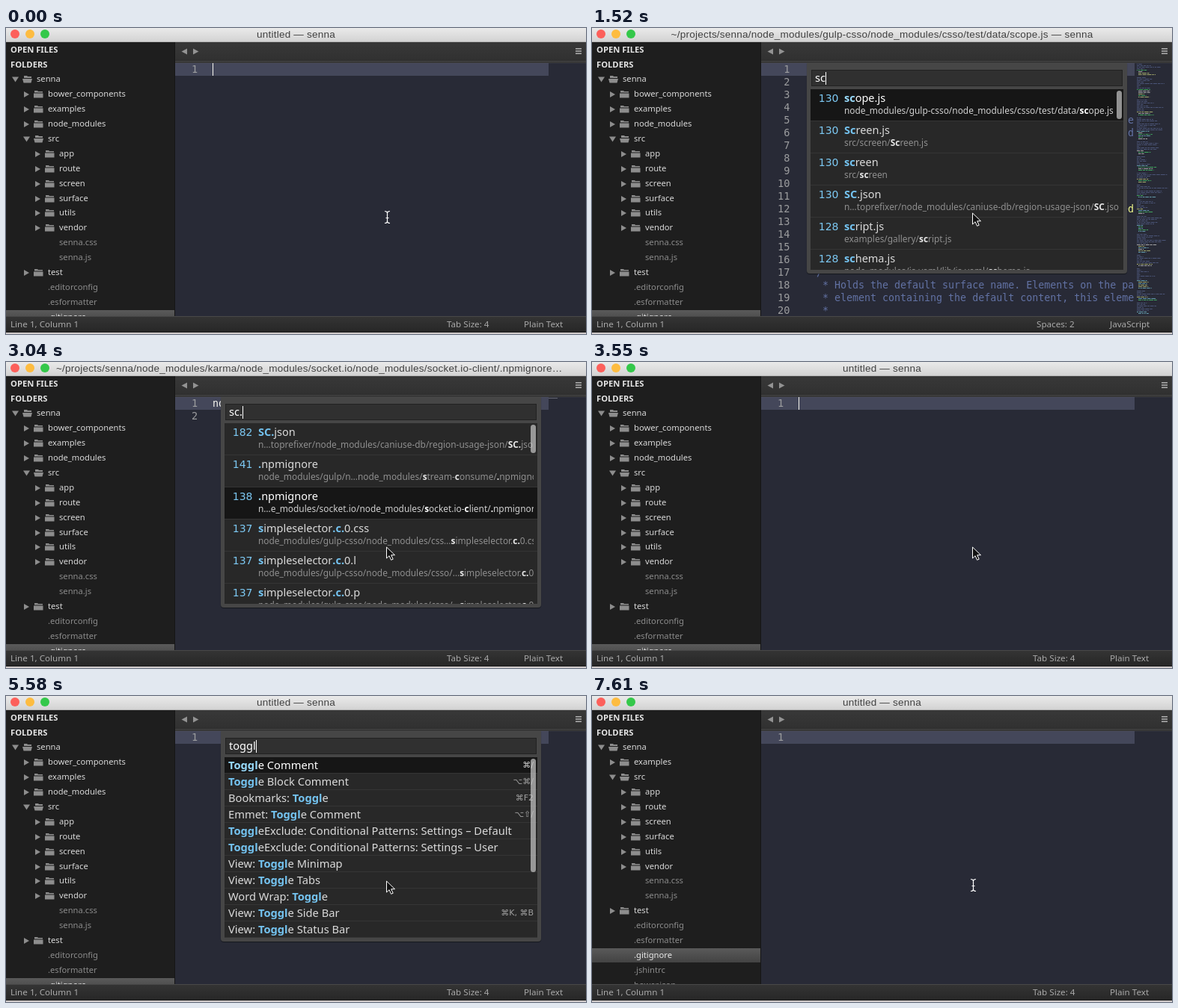
Recreate the animation shown at these times as an HTML page with a canvas. Size 775 px wide and 410 px high, loop 8 s.

```html
<!DOCTYPE html>
<html lang="en">
<head>
<meta charset="utf-8">
<title>Editor quick panel</title>
<style>
html, body { margin: 0; width: 100%; height: 100%; overflow: hidden; background: #282a36; }
#stage { position: relative; width: 775px; height: 410px; overflow: hidden; font: 11.2px "Noto Sans", "Open Sans", sans-serif; color: #d8d8d8; }
#stage div, #stage canvas, #stage svg { position: absolute; white-space: pre; }
#bar { left: 0; top: 0; width: 775px; height: 18px; background: linear-gradient(#eaeaea, #d3d3d3); border-bottom: 1px solid #b5b5b5; }
#bar i { position: absolute; top: 2px; width: 12px; height: 12px; border-radius: 50%; }
#title { left: 0; top: 0; width: 775px; text-align: center; color: #404040; font: 13.5px/17px "Liberation Sans", Arial, sans-serif; letter-spacing: .24px; }
#title.long { left: 67px; width: 708px; text-align: left; }
#side { left: 0; top: 19px; width: 225px; height: 367px; overflow: hidden; background: #1e1e1e; border-right: 1px solid #161616; }
#side .head { left: 6px; line-height: 19.4px; font-weight: 700; color: #e4e4e4; }
#side .row { left: 0; width: 225px; height: 19px; line-height: 17.6px; }
#side .row.file { color: #8b8b8b; }
#side .row.on { background: linear-gradient(#5a5a5a, #434343); color: #e8e8e8; }
#tabs { left: 226px; top: 19px; width: 549px; height: 24px; background: linear-gradient(#383838, #313131); }
#edge { left: 226px; top: 43px; width: 549px; height: 1px; background: #4d4d4d; border: solid #292929; border-width: 1px 0; box-shadow: 0 1px #434343; }
#editor { left: 226px; top: 47px; width: 549px; height: 339px; overflow: hidden; background: #282a36; font: 13.3px/17px "DejaVu Sans Mono", monospace; }
#line { left: 0; top: 0; width: 499px; height: 17px; background: #44475a; }
#nums { left: 22px; top: 0; text-align: right; color: #9c9d9f; font-size: 13.6px; }
#code { left: 50px; top: 0; width: 449px; height: 339px; overflow: hidden; color: #6272a4; }
#caret { left: 50px; top: 0; width: 1px; height: 17px; background: #f8f8f0; }
#map { left: 499px; top: 0; }
#foot { left: 0; top: 386px; width: 775px; height: 20px; line-height: 20px; font-size: 11.65px; color: #a9a9a9; background: linear-gradient(#343434, #272727); border-top: 1px solid #484848; border-bottom: 1px solid #1c1c1c; }
#rim { left: 0; top: 408px; width: 775px; height: 2px; background: #cfcaca; }
#panel { left: 287px; top: 47px; width: 428px; background: #464646; border-radius: 0 0 4px 4px; box-shadow: 0 1px 1px rgba(0, 0, 0, .45); }
#query { left: 6px; top: 9px; width: 410px; height: 20px; padding-left: 4px; border: 1px solid #222; background: #303030; font-size: 14.6px; font-weight: 500; line-height: 19px; color: #fff; }
#query i { display: inline-block; width: 1px; height: 17px; margin-bottom: -4px; background: #fff; }
#list { left: 5px; top: 35px; width: 418px; overflow: hidden; background: #282828; }
#list .item { left: 0; width: 418px; box-sizing: border-box; border-bottom: 1px solid #353535; color: #dadada; font-size: 14.7px; }
#list .item.on { background: #161616; color: #fff; }
#list .name { left: 5px; line-height: 20.6px; font-weight: 500; }
#list b { color: #74c3f0; }
#list .on b { color: #98dafc; }
#list .key { right: 5px; font: 11px/21px "DejaVu Sans", sans-serif; color: #a0a0a0; }
#list .on .key { color: #d0d0d0; }
#list .score { left: 0; width: 37.5px; text-align: right; font: 14px/24px "DejaVu Sans", sans-serif; color: #7cc8f2; }
#list .path { top: 19px; width: 368px; overflow: hidden; font-size: 11.9px; line-height: 19px; color: #8f8f8f; }
#list .path b { color: #e6e6e6; }
#list .on .path { color: #d0d0d0; }
#list .on .path b { color: #fff; }
#thumb { left: 414px; top: 37px; width: 7px; border-radius: 4px; background: rgba(200, 200, 200, .7); }
</style>
</head>
<body>
<div id="stage">
  <div id="bar">
    <i style="left:6px;background:#fc605b"></i><i style="left:26px;background:#fdbc40"></i><i style="left:46px;background:#34c84a"></i>
    <div id="title"></div>
  </div>
  <div id="side"></div>
  <div id="tabs">
    <svg style="left:0;top:0" width="549" height="24" fill="#939393"><path d="M8.5 12.5l7.5-4v8zM31.5 12.5l-7.5-4v8z"/><path d="M535 8h8v1.5h-8zM535 11.2h8v1.5h-8zM535 14.4h8v1.5h-8z" fill="#b0b0b0"/></svg>
  </div>
  <div id="edge"></div>
  <div id="editor">
    <div id="line"></div><div id="nums"></div><div id="code"></div><div id="caret"></div>
    <canvas id="map" width="50" height="339"></canvas>
  </div>
  <div id="foot"></div>
  <div id="rim"></div>
  <div id="panel"><div id="query"></div><div id="list"></div><div id="thumb"></div></div>
  <svg id="arrow" style="left:507px;top:246px" width="16" height="22"><path d="M1.5 2v15l3.6-3.3 2.5 5.6 2.6-1.1-2.5-5.5h4.8z" fill="#111" stroke="#fff"/></svg>
  <svg id="beam" style="left:504px;top:244px" width="12" height="19" fill="none"><path d="M2 1.5q3 0 3.5 2q.5-2 3.5-2M5.5 3.5v12M2 17.5q3 0 3.5-2q.5 2 3.5 2M3.5 10.5h4" stroke="#fff" stroke-width="1.2"/></svg>
</div>
<script>
const $ = id => document.getElementById(id);
const LOOP = 8000;
const bold = s => s.replace(/\[(.*?)\]/g, '<b>$1</b>');
const div = (cls, style, html) => `<div class="${cls}" style="${style}">${html}</div>`;
const ROOT = '~/projects/senna/';
const UNTITLED = 'untitled — senna';

// Sidebar: leading spaces give the depth, "+" closed folder, "-" open folder.
const head = ['-senna', ' +bower_components', ' +examples', ' +node_modules', ' -src'];
const rest = ['  +app', '  +route', '  +screen', '  +surface', '  +utils', '  +vendor', '  senna.css', '  senna.js',
  ' +test', ' .editorconfig', ' .esformatter', ' .gitignore', ' .jshintrc', ' bower.json'];
const fullTree = [...head, ...rest];
const shortTree = fullTree.filter(n => !/bower_components|node_modules/.test(n));

function treeRow(entry, i) {
  const [, pad, mark, name] = entry.match(/^( *)([+-]?)(.*)$/);
  const x = 41 + pad.length * 15;
  const cls = 'row' + (mark ? '' : ' file') + (name === '.gitignore' ? ' on' : '');
  const tri = mark === '-' ? 'M0 6.5h9l-4.5 7z' : 'M1 6l7 4-7 4z';
  const folder = mark === '-'
    ? 'M2 5h4l1 1h5v2H2zM0 9h13l-1.5 5.5h-10z'
    : 'M1 5h4l1 1h6v1.5H1zM0 8.5h12.5v6H0z';
  const icon = mark ? `<svg width="32" height="19" style="left:${x - 33}px;top:0" fill="#8d8d8d"><path d="${tri}"/><path d="${folder}" transform="translate(14)"/></svg>` : '';
  return div(cls, `top:${(39.9 + i * 19.95).toFixed(1)}px`, icon + div('', `left:${x}px`, name));
}
const drawTree = names =>
  div('head', 'top:0', 'OPEN FILES') + div('head', 'top:20px', 'FOLDERS') + names.map(treeRow).join('');

// Panel rows: "score|name|path" for files, "name|keys" for commands.
const files = s => s.trim().split('\n').map(r => {
  const [score, name, path] = r.trim().split('|');
  const x = score ? 45 : 5;
  return div('score', 'top:0', score) + div('name', `left:${x}px;top:1px;font-size:14.5px`, bold(name)) +
    div('path', `left:${x}px;width:${413 - x}px`, bold(path));
});
const commands = s => s.trim().split('\n').map(r => {
  const [name, keys = ''] = r.trim().split('|');
  return div('name', 'top:0', bold(name)) + div('key', 'top:0', keys);
});

const recent = files(`
  |Surface.js|src/surface/Surface.js
  |Screen.js|src/screen/Screen.js
  |.editorconfig|.editorconfig
  |.esformatter|.esformatter
  |.gitignore|.gitignore
  |.jshintrc|.jshintrc`);
const byS = files(`
  78|[s]tatic08.html|examples/gallery/[s]tatic08.html
  78|[s]ample|node_modules/gulp-header/test/[s]ample
  78|[s]tylish.js|node_modules/jshint-stylish/[s]tylish.js
  78|[s]afari.html|node_modules/karma-safari-launcher/[s]afari.html
  78|[S]creen.js|src/screen/[S]creen.js
  78|[S]urface.js|src/surface/[S]urface.js`);
const bySc = files(`
  130|[sc]ope.js|node_modules/gulp-csso/node_modules/csso/test/data/[sc]ope.js
  130|[Sc]reen.js|src/screen/[Sc]reen.js
  130|[sc]reen|src/[sc]reen
  130|[SC].json|n…toprefixer/node_modules/caniuse-db/region-usage-json/[SC].json
  128|[sc]ript.js|examples/gallery/[sc]ript.js
  128|[sc]hema.js|node_modules/js-yaml/lib/js-yaml/[sc]hema.js`);
const byScDot = files(`
  182|[SC.]json|n…toprefixer/node_modules/caniuse-db/region-usage-json/[SC.]json
  141|[.]npmignore|node_modules/gulp/n…node_modules/[s]tream-[c]onsume/[.]npmignore
  138|[.]npmignore|n…e_modules/socket.io/node_modules/[s]ocket.io-[c]lient/[.]npmignore
  137|[s]impleselector[.c.]0.css|node_modules/gulp-csso/node_modules/css…[s]impleselector.[c.]0.css
  137|[s]impleselector[.c.]0.l|node_modules/gulp-csso/node_modules/csso/…[s]impleselector.[c.]0.l
  137|[s]impleselector[.c.]0.p|node_modules/gulp-csso/node_modules/csso/…[s]impleselector.[c.]0.p`);
const allCommands = commands(`
  Bookmarks: Clear All|⇧⌘F2
  Bookmarks: Select All
  Bookmarks: Toggle|⌘F2
  Code Folding: Fold All
  Code Folding: Unfold All|⌘K, ⌘J
  Convert Case: Lower Case|⌘K, ⌘L
  Convert Case: Swap Case
  Convert Case: Title Case
  Convert Case: Upper Case|⌘K, ⌘U
  Emmet: Balance (inward)
  Emmet: Balance (outward)`);
const byToggl = commands(`
  [Toggl]e Comment|⌘/
  [Toggl]e Block Comment|⌥⌘/
  Bookmarks: [Toggl]e|⌘F2
  Emmet: [Toggl]e Comment|⌥⇧/
  [Toggl]eExclude: Conditional Patterns: Settings – Default
  [Toggl]eExclude: Conditional Patterns: Settings – User
  View: [Toggl]e Minimap
  View: [Toggl]e Tabs
  Word Wrap: [Toggl]e
  View: [Toggl]e Side Bar|⌘K, ⌘B
  View: [Toggl]e Status Bar`);
const byExc = commands(`
  [ToggleExc]lude: Conditional Patterns: Settings – Default
  [ToggleExc]lude: Conditional Patterns: Settings – User
  [ToggleExc]lude: Conditional File / Folder Patterns: Enable`);

const panel = (rows, row, query, more = {}) => ({ rows, row, query, sel: 0, shift: 0, thumb: 38, caret: true, ...more });
const filePanel = (rows, query, more) => panel(rows, 43, query, more);
const cmdPanel = (rows, query, more) => panel(rows, 22, query, more);

const js = { lang: ['Spaces: 2', 'JavaScript'], doc: 'js' };
const ignore = { doc: 'short' };
const scenes = [
  { at: 0, caret: true, beam: true },
  { at: 510, panel: filePanel(recent, '') },
  { at: 1020, ...js, title: ROOT + 'src/surface/Surface.js — senna', panel: filePanel(byS, 's', { sel: 5, shift: -17 }) },
  { at: 1520, ...js, title: ROOT + 'node_modules/gulp-csso/node_modules/csso/test/data/scope.js — senna', panel: filePanel(bySc, 'sc') },
  { at: 2030, ...ignore, lang: ['Tab Size: 4', 'JSON'], title: ROOT + 'node_modules/autoprefixer/node_modules/caniuse-db/region-usage-json/SC.json — senna', long: true, panel: filePanel(byScDot, 'sc.') },
  { at: 2530, ...ignore, left: 'On add-cover-route* in senna, Line 1, Column 1', title: ROOT + 'node_modules/gulp/node_modules/orchestrator/node_modules/stream-consume/.npmignore…', long: true, panel: filePanel(byScDot, 'sc.', { sel: 1, caret: false }) },
  { at: 3040, ...ignore, title: ROOT + 'node_modules/karma/node_modules/socket.io/node_modules/socket.io-client/.npmignore…', long: true, panel: filePanel(byScDot, 'sc.', { sel: 2 }) },
  { at: 3550, caret: true },
  { at: 4060, panel: cmdPanel(allCommands, '') },
  { at: 4560, panel: cmdPanel(allCommands, '', { caret: false }) },
  { at: 5070, panel: cmdPanel(allCommands, '') },
  { at: 5580, panel: cmdPanel(byToggl, 'toggl', { thumb: 152 }) },
  { at: 6090, beam: true, panel: cmdPanel(byExc, 'toggleexc', { thumb: 0 }) },
  { at: 6590, beam: true, panel: cmdPanel(byExc, 'toggleexc', { thumb: 0, sel: 1, caret: false }) },
  { at: 7100, beam: true, caret: true },
  { at: 7610, beam: true, tree: shortTree }
];

const codeLine = (n, x, text, color = '') =>
  div('', `left:${x}px;top:${(n - 1) * 17}px;color:${color}`, text);
const docs = {
  blank: { lines: 1, code: '' },
  short: { lines: 2, code: codeLine(1, 0, 'node_modules', '#f8f8f2') },
  js: {
    lines: 20,
    code: codeLine(5, 440, 'e') + codeLine(6, 440, 'd') + codeLine(12, 432, 'ed', '#f1fa8c') +
      codeLine(17, 24, '/**') +
      codeLine(18, 32, '* Holds the default surface name. Elements on the page') +
      codeLine(19, 32, '* element containing the default content, this element') +
      codeLine(20, 32, '*')
  }
};

function drawMap(kind) {
  const g = $('map').getContext('2d');
  g.clearRect(0, 0, 50, 339);
  if (kind === 'blank') return;
  g.globalAlpha = .6;
  if (kind === 'short') {
    g.fillStyle = '#8b8d98';
    g.fillRect(0, 1, 12, 1);
    return;
  }
  let seed = 11;
  const rnd = () => (seed = seed * 16807 % 2147483647) / 2147483647;
  const words = (y, x, end, color) => {
    g.fillStyle = color;
    while (x < end) {
      const w = 1 + rnd() * 5;
      g.fillRect(x, y, Math.min(w, end - x), 1);
      x += w + 1;
    }
  };
  for (let y = 1; y < 336; y += 2) {
    const comments = 4 + rnd() * 6 | 0, body = 2 + rnd() * 5 | 0;
    for (let i = 0; i < comments && y < 336; i++, y += 2)
      words(y, 3, 6 + rnd() * (i % 3 ? 40 : 12), '#6272a4');
    for (let i = 0; i < body && y < 336; i++, y += 2)
      words(y, i ? 5 : 3, 10 + rnd() * 20, ['#f1fa8c', '#f8f8f2', '#8be9fd', '#50fa7b'][rnd() * 4 | 0]);
  }
}

function drawPanel(p) {
  $('panel').style.display = p ? '' : 'none';
  if (!p) return;
  const height = Math.min(242, p.rows.length * p.row);
  $('panel').style.height = height + 40 + 'px';
  $('list').style.height = height + 'px';
  $('query').innerHTML = p.query + (p.caret ? '<i></i>' : '');
  $('list').innerHTML = p.rows.map((r, i) =>
    div('item' + (i === p.sel ? ' on' : ''), `top:${i * p.row + p.shift}px;height:${p.row}px`, r)).join('');
  $('thumb').style.height = p.thumb + 'px';
}

function draw(s) {
  const { title = UNTITLED, left = 'Line 1, Column 1', lang = ['Tab Size: 4', 'Plain Text'], doc = 'blank', tree = fullTree } = s;
  $('title').textContent = title;
  $('title').className = s.long ? 'long' : '';
  $('side').innerHTML = drawTree(tree);
  $('foot').innerHTML = div('', 'left:6px', left) +
    div('', `left:${lang[0] === 'Spaces: 2' ? 594 : 589}px`, lang[0]) + div('', 'left:692px', lang[1]);
  $('nums').textContent = Array.from({ length: docs[doc].lines }, (_, i) => i + 1).join('\n');
  $('code').innerHTML = docs[doc].code;
  drawMap(doc);
  $('caret').style.display = s.caret ? '' : 'none';
  $('beam').style.display = s.beam ? '' : 'none';
  $('arrow').style.display = s.beam ? 'none' : '';
  drawPanel(s.panel);
}

let shown;
const start = performance.now();
function tick() {
  const t = (performance.now() - start) % LOOP;
  const scene = scenes.filter(s => s.at <= t).pop() || scenes[0];
  if (scene !== shown) draw(shown = scene);
  requestAnimationFrame(tick);
}
tick();
</script>
</body>
</html>
```
